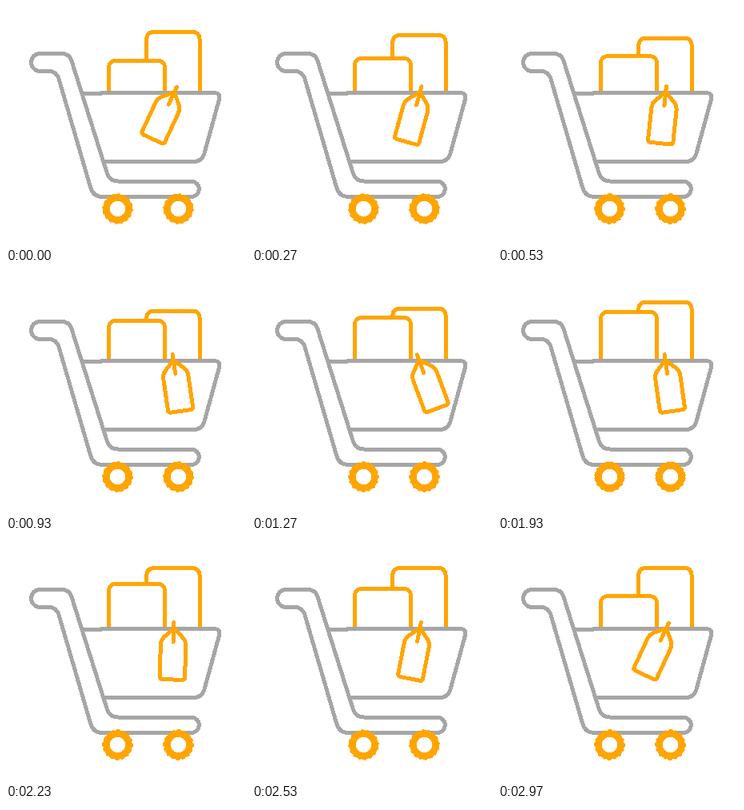
An HTML page that plays this animation: 300x300 px, repeating every 3010 ms.

```html
<!DOCTYPE html>
<html lang="en">
<head>
<meta charset="utf-8">
<title>Shopping cart</title>
<style>
  html, body { margin: 0; width: 100%; height: 100%; overflow: hidden; background: #fff; }
  svg { display: block; width: 100%; height: 100%; shape-rendering: crispEdges; }
  .cart, .item { stroke-width: 5; stroke-linecap: round; stroke-linejoin: round; }
  .cart { fill: none; stroke: #a6a6a6; }
  .item { fill: #fff; stroke: #ffa500; }
  .wheel circle { fill: none; stroke: #ffa500; }
</style>
</head>
<body>
<svg viewBox="0 0 300 300">
  <defs>
    <g id="wheel" class="wheel">
      <circle r="14" stroke-width="8.6"/>
      <circle r="18.2" stroke-width="2" pathLength="32" stroke-dasharray="1 1"/>
    </g>
  </defs>
  <path id="tallBox" class="item"/>
  <path id="shortBox" class="item"/>
  <g class="cart">
    <path d="M42.5 59.5H69Q78.5 59.5 81.5 67L126 208Q129 219 140 219H231.5A9.5 9.5 0 0 1 231.5 238.5H121Q109.5 238.5 106 228L66 91Q63 81.5 54 81.5H42.5A11 11 0 0 1 42.5 59.5Z"/>
    <path d="M97 109.5H118L120 108.5H261Q267.5 109 267 115L248 184Q245 194.5 235 194.5H122"/>
  </g>
  <g id="tag">
    <path class="item" d="M-2 0Q0-2 2 0L12 10Q15.7 14 15.7 20V59Q15.7 62.5 12 62.5H-12Q-15.7 62.5-15.7 59V20Q-15.7 14-12 10Z"/>
    <path class="item" d="M0-9V15"/>
  </g>
  <use id="rearWheel" href="#wheel"/>
  <use id="frontWheel" href="#wheel"/>
</svg>
<script>
const LOOP = 3010;
const RAIL_Y = 108;
const byId = id => document.getElementById(id);

// Linear interpolation through [time, value] keys.
function track(time, keys) {
  let i = 1;
  while (i < keys.length - 1 && time > keys[i][0]) i++;
  const [t0, v0] = keys[i - 1], [t1, v1] = keys[i];
  return v0 + (v1 - v0) * (time - t0) / (t1 - t0);
}

function drawBox(id, left, right, top) {
  const r = 8;
  byId(id).setAttribute('d',
    `M${left} ${RAIL_Y}V${top + r}A${r} ${r} 0 0 1 ${left + r} ${top}` +
    `H${right - r}A${r} ${r} 0 0 1 ${right} ${top + r}V${RAIL_Y}`);
}

function place(id, x, y, angle) {
  byId(id).setAttribute('transform', `translate(${x} ${y}) rotate(${angle})`);
}

function render(time) {
  drawBox('tallBox', 175.9, 242, track(time, [[0, 32.5], [980, 46.8], [2110, 32.8], [LOOP, 32.5]]));
  drawBox('shortBox', 128.5, 198.5, track(time, [[0, 68.5], [1975, 47], [LOOP, 68.5]]));
  place('tag', 209.5, 109.5, track(time, [[0, 25], [1400, -25], [2970, 25], [LOOP, 25]]));
  const spin = time / LOOP * 360;
  place('rearWheel', 139.5, 253.5, spin);
  place('frontWheel', 215.5, 253.5, spin);
}

function tick() {
  render(performance.now() % LOOP);
  requestAnimationFrame(tick);
}
tick();
</script>
</body>
</html>
```
